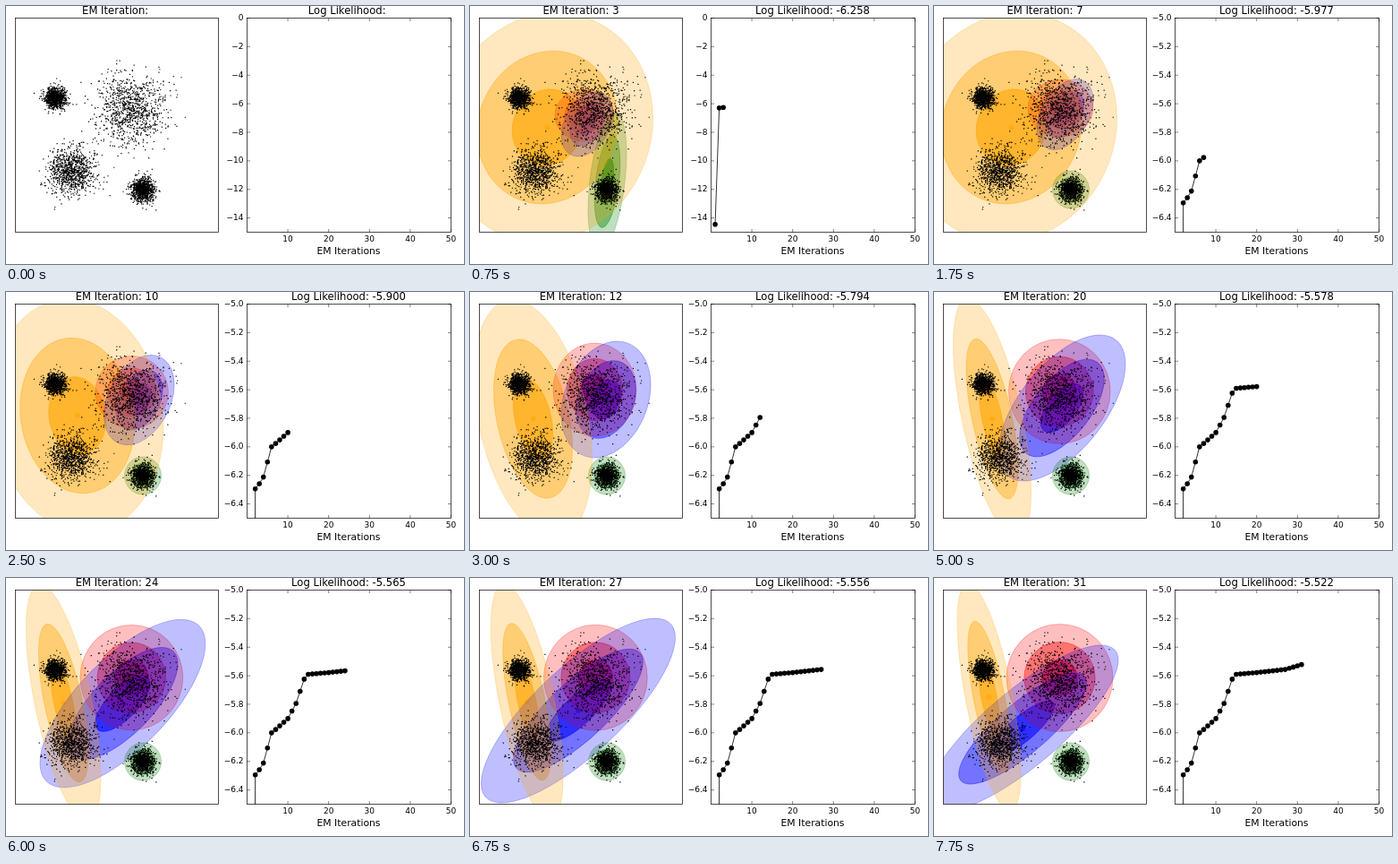
These frames come from a looping animation (512x288 px, 8000 ms). An HTML page with a canvas:

```html
<!DOCTYPE html>
<html lang="en">
<head>
<meta charset="utf-8">
<title>EM iterations</title>
<style>
html, body { margin: 0; width: 512px; height: 288px; overflow: hidden; background: #fff; }
canvas { display: block; }
</style>
</head>
<body>
<canvas id="stage" width="512" height="288"></canvas>
<script>
const ctx = document.getElementById('stage').getContext('2d');
const STEP = 250, STEPS = 32;
const LEFT = { x: 10.5, y: 13.5, w: 227, h: 239 };
const RIGHT = { x: 269.5, y: 13.5, w: 228, h: 239 };

// Key values by iteration; the rest is interpolated
const likelihoodKeys = {
  1: [-14.45], 2: [-6.295], 3: [-6.258], 4: [-6.212], 6: [-6], 7: [-5.977], 10: [-5.9],
  12: [-5.794], 14: [-5.624], 15: [-5.59], 20: [-5.578], 27: [-5.556], 31: [-5.522],
};

// Key poses by iteration: centre x, centre y, half width, half height (3 sigma), correlation
const components = [
  { color: 'red', poses: {
    3: [128, 122, 33, 29, 0], 7: [141.5, 114, 36.5, 32, 0],
    12: [139.5, 109, 46.5, 52, 0], 31: [140.5, 111.5, 59.5, 60, 0] } },
  { color: 'blue', poses: {
    3: [131, 132, 29, 36, -.35], 7: [146.5, 121, 31.5, 39.5, -.4], 12: [152, 120, 50, 65, -.25],
    20: [143, 129.5, 71, 81.5, -.6], 27: [121, 148, 108.5, 103, -.79], 31: [99, 168, 107, 93, -.82] } },
  { color: 'green', poses: { 3: [153.5, 196, 21.5, 77, -.4], 7: [153, 205, 20.5, 21, 0] } },
  { color: 'orange', poses: {
    7: [86.5, 135.5, 118, 128, -.08], 12: [70.5, 141.5, 66, 133, .35],
    20: [65, 141.5, 43.5, 134, .62], 31: [61.5, 133, 35.5, 127, .66] } },
];
const rings = [{ sigma: 1, alpha: .6 }, { sigma: 2, alpha: .4 }, { sigma: 3, alpha: .25 }];

// Interpolates between keys; pace says how far n has come from one key to the next
function between(keys, n, pace = i => i) {
  const stops = Object.keys(keys).map(Number);
  const next = stops.findIndex(s => s >= n);
  if (next < 0) return keys[stops.at(-1)];
  if (next === 0) return keys[stops[0]];
  const a = stops[next - 1], b = stops[next];
  const f = (pace(n) - pace(a)) / (pace(b) - pace(a));
  return keys[a].map((v, i) => v + (keys[b][i] - v) * f);
}

const logLik = n => between(likelihoodKeys, n)[0];

function seededRandom(seed) {
  return () => {
    seed = seed + 0x6D2B79F5 | 0;
    let r = Math.imul(seed ^ seed >>> 15, 1 | seed);
    r = r + Math.imul(r ^ r >>> 7, 61 | r) ^ r;
    return ((r ^ r >>> 14) >>> 0) / 4294967296;
  };
}

const samples = new Path2D();
const random = seededRandom(7);
for (const [cx, cy, sigma] of [[55, 102.5, 6], [141, 115.5, 19.5], [74.5, 184, 12.8], [153, 205, 6.3]]) {
  for (let i = 0; i < 1000; i++) {
    const radius = sigma * Math.sqrt(-2 * Math.log(1 - random()));
    const angle = 2 * Math.PI * random();
    samples.rect(cx + radius * Math.cos(angle) - .6, cy + radius * Math.sin(angle) - .6, 1.2, 1.2);
  }
}

function text(string, x, y, size, align = 'center') {
  ctx.font = `${size}px "DejaVu Sans", sans-serif`;
  ctx.textAlign = align;
  ctx.fillStyle = '#000';
  ctx.fillText(string, x, y);
}

function line(x1, y1, x2, y2) {
  ctx.beginPath();
  ctx.moveTo(x1, y1);
  ctx.lineTo(x2, y2);
  ctx.stroke();
}

function disc(x, y, radius) {
  ctx.beginPath();
  ctx.arc(x, y, radius, 0, 2 * Math.PI);
  ctx.fill();
}

function clipped(box, draw) {
  ctx.save();
  ctx.beginPath();
  ctx.rect(box.x, box.y, box.w, box.h);
  ctx.clip();
  draw();
  ctx.restore();
}

function frame({ x, y, w, h }) {
  ctx.strokeStyle = '#000';
  ctx.lineWidth = .7;
  ctx.strokeRect(x, y, w, h);
}

function ellipse([cx, cy, hw, hh, rho], scale) {
  ctx.save();
  ctx.transform(hw * scale, hh * scale * rho, 0, hh * scale * Math.sqrt(1 - rho * rho), cx, cy);
  ctx.beginPath();
  ctx.arc(0, 0, 1, 0, 2 * Math.PI);
  ctx.restore();
  ctx.fill();
  ctx.stroke();
}

function drawComponents(n) {
  ctx.lineWidth = 1;
  for (const { sigma, alpha } of rings) {
    ctx.globalAlpha = alpha;
    for (const { color, poses } of components) {
      const pose = between(poses, n, logLik);
      ctx.fillStyle = ctx.strokeStyle = color;
      ellipse(pose, sigma / 3);
      if (sigma === 1) disc(pose[0], pose[1], 3);
    }
  }
  ctx.globalAlpha = 1;
}

function drawMixture(n) {
  clipped(LEFT, () => {
    if (n) drawComponents(n);
    ctx.fillStyle = '#000';
    ctx.fill(samples);
  });
  frame(LEFT);
  text(`EM Iteration: ${n || ''}`, 124, 8.8, 11.6);
}

function drawChart(n) {
  const zoomed = n >= 5;
  const top = zoomed ? -5 : 0, span = zoomed ? 1.5 : 15, spacing = zoomed ? .2 : 2;
  const { x, y, w, h } = RIGHT;
  const px = i => x + i / 50 * w;
  const py = v => y + (top - v) / span * h;

  clipped(RIGHT, () => {
    ctx.strokeStyle = ctx.fillStyle = '#000';
    ctx.lineWidth = .8;
    for (let i = 1; i <= n; i++) {
      if (i > 1) line(px(i - 1), py(logLik(i - 1)), px(i), py(logLik(i)));
      disc(px(i), py(logLik(i)), 2.8);
    }
  });

  frame(RIGHT);
  ctx.lineWidth = .5;
  for (let i = 10; i <= 50; i += 10) {
    line(px(i), y, px(i), y + 3.5);
    line(px(i), y + h, px(i), y + h - 3.5);
    text(i, px(i), 262.7, 9);
  }
  for (let i = 0; i < 8; i++) {
    const v = top - i * spacing, ty = py(v);
    line(x, ty, x + 3.5, ty);
    line(x + w, ty, x + w - 3.5, ty);
    text((v < 0 ? '\u2212' : '') + Math.abs(v).toFixed(zoomed ? 1 : 0), 265.5, ty + 2.6, 9, 'right');
  }
  text('EM Iterations', 383, 277.2, 10.8);
  text(`Log Likelihood: ${n ? logLik(n).toFixed(3) : ''}`, 383, 8.8, 11.6);
}

const start = performance.now();
function tick() {
  const n = Math.floor((performance.now() - start) / STEP) % STEPS;
  ctx.fillStyle = '#fff';
  ctx.fillRect(0, 0, 512, 288);
  drawMixture(n);
  drawChart(n);
  requestAnimationFrame(tick);
}
tick();
</script>
</body>
</html>
```
